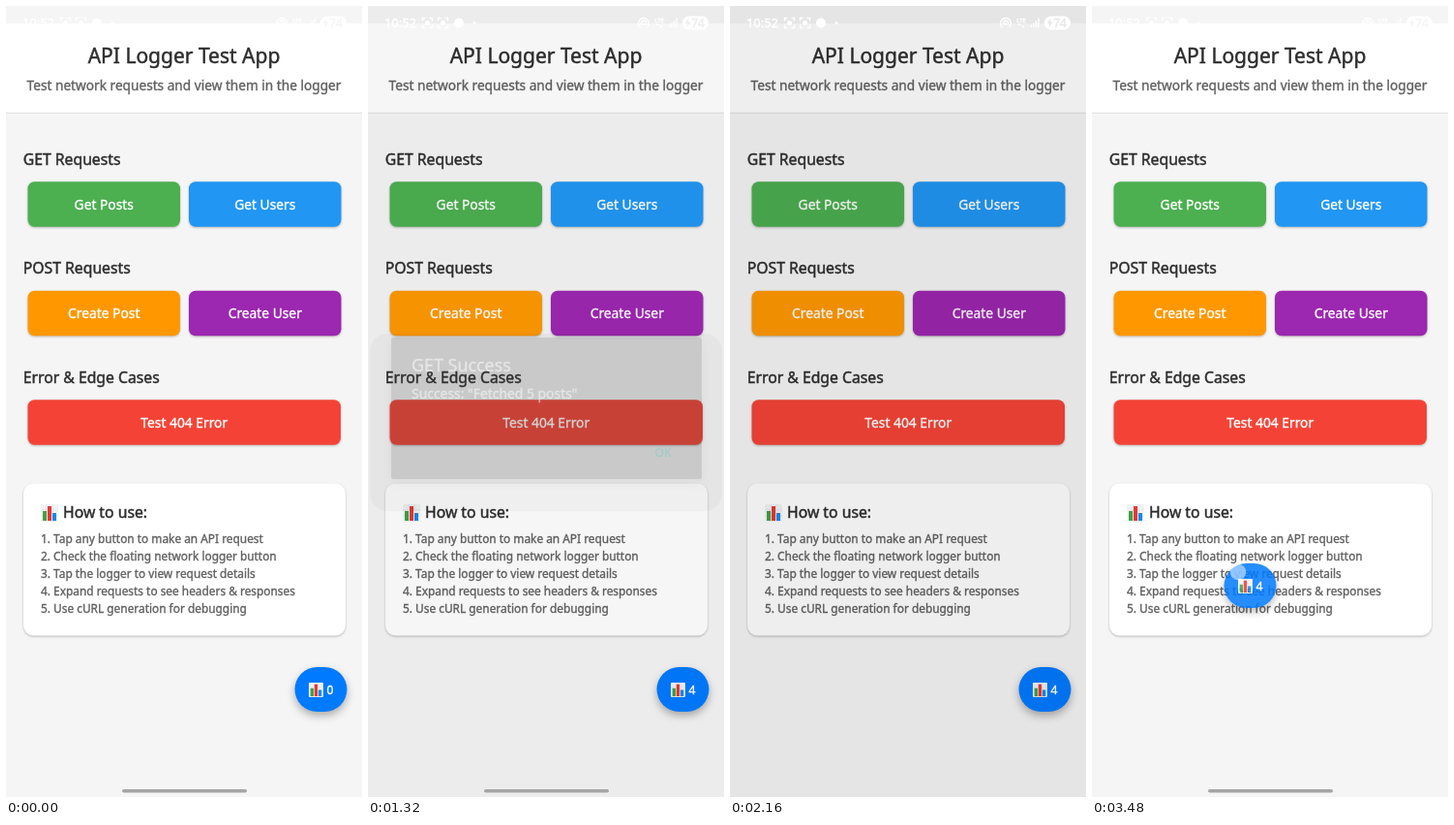
These frames come from a looping animation (368x816 px, 3.6 s). An HTML page:

```html
<!DOCTYPE html>
<html lang="en">
<head>
<meta charset="utf-8">
<style>
html, body { margin: 0; width: 100%; height: 100%; overflow: hidden; background: #f5f5f5; }
svg { display: block; width: 368px; height: 816px; font-family: "Noto Sans", "Open Sans", sans-serif; }
text { stroke: currentColor; stroke-width: .35; fill: currentColor; }
.dark { color: #2d2d2d; font-size: 15.75px; stroke-width: .45; }
.list { color: #606060; font-size: 11.88px; }
.label { color: #fff; font-size: 13.8px; text-anchor: middle; }
.raised { filter: drop-shadow(0 1px 1px rgba(0, 0, 0, .25)); }
</style>
</head>
<body>
<svg viewBox="0 0 368 816">
  <defs>
    <g id="chart">
      <rect width="18" height="18" rx="1" fill="#f1f4f5"/>
      <path d="M0 6H18M0 12H18M6 0V18M12 0V18" stroke="#d5dee2" stroke-width=".6"/>
      <path d="M2 7H6V17H2Z" fill="#43a047"/>
      <path d="M7 2H11V17H7Z" fill="#e53935"/>
      <path d="M12 9H16V17H12Z" fill="#1e88e5"/>
    </g>
    <g id="scan" fill="none" stroke="#fff" stroke-width="1.4">
      <path d="M-5 -2V-5H-2M2 -5H5V-2M5 2V5H2M-2 5H-5V2"/>
      <circle r="1.8" fill="#fff"/>
    </g>
  </defs>

  <rect width="368" height="816" fill="#f5f5f5"/>
  <rect y="18" width="368" height="92" fill="#fff"/>
  <rect y="109.8" width="368" height="1" fill="#e0e0e0"/>
  <text class="dark" x="184" y="58.6" style="font-size:21px" text-anchor="middle">API Logger Test App</text>
  <text x="184" y="87.4" font-size="13.66" text-anchor="middle" color="#606060">Test network requests and view them in the logger</text>

  <text class="dark" x="17.7" y="163.7">GET Requests</text>
  <text class="dark" x="17.7" y="276.2">POST Requests</text>
  <text class="dark" x="17.7" y="388.7">Error &amp; Edge Cases</text>
  <g id="buttons"></g>
  <path id="spinner" fill="none" stroke="#fff" stroke-width="1.5"/>

  <rect class="raised" x="18" y="492.5" width="333" height="157" rx="10.5" fill="#fff"/>
  <use href="#chart" x="36" y="514"/>
  <text class="dark" x="59" y="527.6">How to use:</text>
  <g id="steps"></g>

  <g id="badge">
    <rect x="-27" y="-23" width="54" height="46" rx="23" fill="#007aff" style="filter:drop-shadow(0 4px 4px rgba(0,0,0,.3))"/>
    <use href="#chart" transform="translate(-12.5 -7)scale(.83)"/>
    <text id="count" x="9.5" y="4.8" text-anchor="middle" font-size="12.2" color="#fff"></text>
  </g>

  <rect id="dim" width="368" height="816"/>

  <g id="panel">
    <rect x="2" y="338" width="364" height="183" rx="18" fill-opacity=".14"/>
    <rect x="24" y="342" width="321" height="146" rx="2" fill="#424242" style="filter:drop-shadow(0 4px 6px rgba(0,0,0,.25))"/>
  </g>
  <g id="message" color="#fff">
    <text x="45" y="377.3" font-size="17.9">GET Success</text>
    <text x="45" y="404.8" font-size="13.9">Success: "Fetched 5 posts"</text>
    <text x="296.5" y="465.3" font-size="12.2" color="#80cbc4">OK</text>
  </g>

  <g color="#fff">
    <text x="17" y="22" font-size="12.9">10:52</text>
    <use href="#scan" x="61.5" y="17.5"/>
    <use href="#scan" x="77.5" y="17.5"/>
    <circle cx="94" cy="17.5" r="5" fill="#fff"/>
    <circle cx="110" cy="17.5" r="1.6" fill="#fff"/>
    <g fill="none" stroke="#fff" stroke-width="1.4">
      <path d="M281.5 22A5.4 5.4 0 1 1 288.5 22M283 19.5A2.6 2.6 0 1 1 287 19.5"/>
      <path d="M311.5 22V19.5M314 22V17.5M316.5 22V15M319 22V12.5"/>
    </g>
    <circle cx="285" cy="18.5" r="1.3" fill="#fff"/>
    <text x="301" y="16.5" font-size="6" text-anchor="middle">LTE</text>
    <path d="M297 20L299 17.8L301 20ZM301 20.5H305L303 22.8Z" fill="#fff"/>
    <rect x="325" y="10.5" width="27" height="14" rx="7" fill="#fff"/>
    <g id="charge">
      <path d="M331.5 12.5L328 18H330.5L329.5 22.5L333.5 16.5H331Z" fill="currentColor"/>
      <text x="341" y="21.8" font-size="12" text-anchor="middle">74</text>
    </g>
  </g>
  <rect id="home" x="120" y="808" width="129" height="3.5" rx="1.75" fill="#a5a5a5"/>
  <circle id="touch" r="8.3" fill="#fff" fill-opacity=".5"/>
</svg>

<script>
const LOOP = 3600, STEP = 120;
const $ = id => document.getElementById(id);
const show = (el, on) => el.setAttribute('visibility', on ? 'visible' : 'hidden');
const fade = (el, a) => el.setAttribute('opacity', a);
const move = (el, x, y) => el.setAttribute('transform', `translate(${x} ${y})`);
const mix = (a, b, u) => a + (b - a) * u;

const button = (x, y, w, color, label) =>
  `<g><rect class="raised" x="${x}" y="${y}" width="${w}" height="46.5" rx="7" fill="${color}"/>
  <text class="label" x="${x + w / 2}" y="${y + 28.5}">${label}</text></g>`;
$('buttons').innerHTML =
  button(22.5, 181.2, 157.5, '#4caf50', 'Get Posts') +
  button(189, 181.2, 157.5, '#2196f3', 'Get Users') +
  button(22.5, 293.8, 157.5, '#ff9800', 'Create Post') +
  button(189, 293.8, 157.5, '#9c27b0', 'Create User') +
  button(22.5, 406.3, 323.5, '#f44336', 'Test 404 Error');

$('steps').innerHTML = [
  'Tap any button to make an API request',
  'Check the floating network logger button',
  'Tap the logger to view request details',
  'Expand requests to see headers &amp; responses',
  'Use cURL generation for debugging'
].map((s, i) => `<text class="list" x="36" y="${554.2 + 18 * i}">${i + 1}. ${s}</text>`).join('');

// Linear interpolation through [time, value] pairs
function track(t, keys) {
  if (t <= keys[0][0]) return keys[0][1];
  for (let i = 1; i < keys.length; i++) {
    const [a, from] = keys[i - 1], [b, to] = keys[i];
    if (t <= b) return mix(from, to, (t - a) / (b - a));
  }
  return keys[keys.length - 1][1];
}

const bezier = (a, b, c, d, u) =>
  a * (1 - u) ** 3 + 3 * b * u * (1 - u) ** 2 + 3 * c * u * u * (1 - u) + d * u ** 3;

const dimKeys = [[1200, 0], [1320, .035], [1440, .3], [1560, .54], [1680, .6],
  [1920, .6], [2040, .56], [2160, .065], [2280, 0]];
const dialogKeys = [[1200, 0], [1320, .2], [1440, .75], [1560, 1], [1920, 1], [2040, .65], [2160, 0]];

const getButton = $('buttons').firstElementChild;
const getLabel = getButton.querySelector('text');

function drawSpinner(t) {
  const start = (t - 480) / 1000 * 2 * Math.PI;
  const end = start + 2.7 + 1.7 * Math.cos((t - 480) / 1333 * 2 * Math.PI);
  const point = a => `${101 + 7 * Math.cos(a)} ${204.7 + 7 * Math.sin(a)}`;
  $('spinner').setAttribute('d', `M${point(start)}A7 7 0 ${+(end - start > Math.PI)} 1 ${point(end)}`);
}

function draw(t) {
  const loading = t >= 360 && t < 1200;
  const pressing = t >= 120 && t < 360;
  const confirming = t >= 1920 && t < 2160;
  const dragging = t >= 2640;

  show(getLabel, !loading);
  show($('spinner'), loading);
  drawSpinner(t);
  fade(getButton, pressing ? .8 : 1);
  $('count').textContent = t < 1200 ? 0 : 4;

  const u = dragging ? (t - 2640) / 840 : 0;
  const x = bezier(325.5, 300, 230, 163.5, u), y = bezier(705, 420, 440, 598, u);
  move($('badge'), x, y);
  fade($('badge'), t > 2640 ? .85 : 1);

  show($('touch'), pressing || confirming || dragging);
  if (pressing) move($('touch'), 105, 207);
  else if (confirming) move($('touch'), 290, 459);
  else move($('touch'), x + mix(8.5, -12.5, u), y + mix(-7, -14, u));

  const dim = track(t, dimKeys), grey = Math.round(245 * (1 - dim));
  const dialog = track(t, dialogKeys);
  fade($('dim'), dim);
  fade($('panel'), dialog);
  fade($('message'), dialog ** .4);
  $('charge').setAttribute('color', `rgb(${grey},${grey},${grey})`);
  show($('home'), t < 2160 || t >= 2280);
}

const began = performance.now();
function frame() {
  const t = (performance.now() - began) % LOOP;
  draw(Math.floor(t / STEP) * STEP);
  requestAnimationFrame(frame);
}
frame();
</script>
</body>
</html>
```
